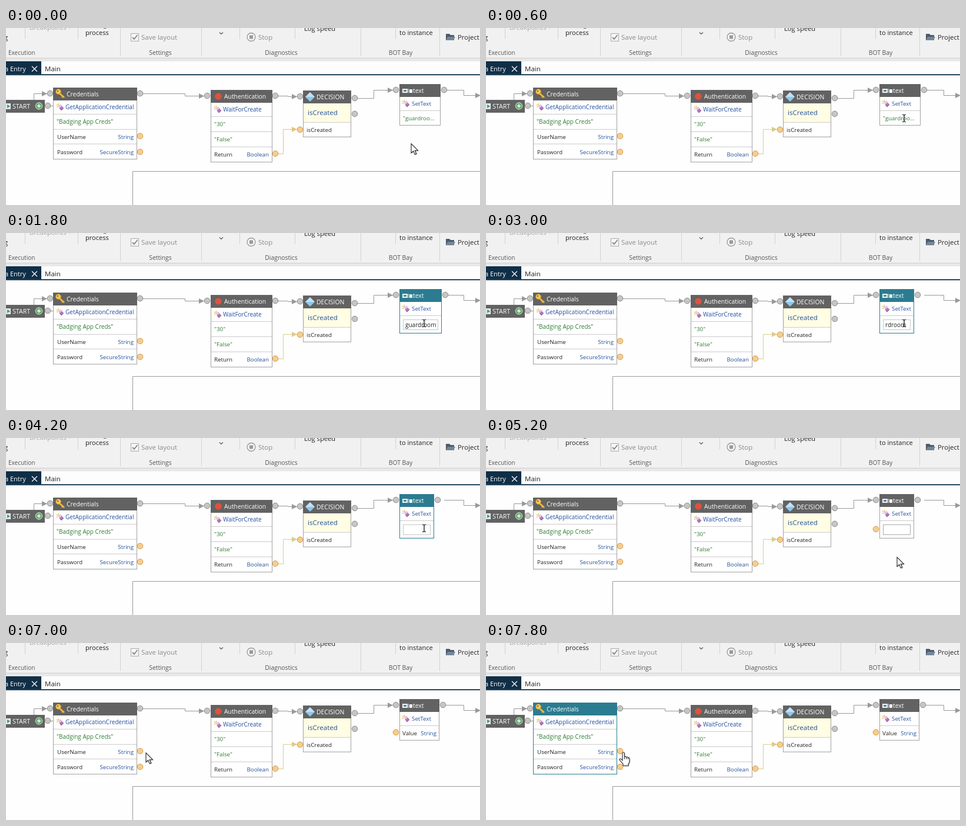
Animation, 806 px wide and 303 px high, one loop 8 s. Source, as an HTML page with a canvas:

```html
<!DOCTYPE html>
<html lang="en">
<head>
<meta charset="utf-8">
<title>Workflow designer</title>
<style>
  html, body { margin: 0; width: 100%; height: 100%; overflow: hidden; background: #fefefe; }
  canvas { display: block; }
</style>
</head>
<body>
<canvas id="stage" width="806" height="303"></canvas>
<script>
const ctx = document.getElementById('stage').getContext('2d');
const LOOP = 8000, STEP = 200;
const INK = '#222', GRAY = '#8f8f8f', GREEN = '#2f7d32', BLUE = '#24509a';
const HEADER = '#626262', TEAL = '#2b7c90';
const USER = 'guardroom';

// ---------- helpers ----------
function text(s, x, y, color = INK, size = 9.8, align = 'left') {
  ctx.font = `${size}px "Open Sans", "Noto Sans", sans-serif`;
  ctx.textAlign = align;
  ctx.fillStyle = color;
  ctx.fillText(s, x, y);
}
function rect(x, y, w, h, color) {
  ctx.fillStyle = color;
  ctx.fillRect(x, y, w, h);
}
function frame(x, y, w, h, color) {
  ctx.strokeStyle = color;
  ctx.lineWidth = 1;
  ctx.strokeRect(x + .5, y + .5, w - 1, h - 1);
}
function line(color, width, ...pts) {
  ctx.strokeStyle = color;
  ctx.lineWidth = width;
  ctx.beginPath();
  for (let i = 0; i < pts.length; i += 2) ctx.lineTo(pts[i], pts[i + 1]);
  ctx.stroke();
}
function poly(fill, ...pts) {
  ctx.fillStyle = fill;
  ctx.beginPath();
  for (let i = 0; i < pts.length; i += 2) ctx.lineTo(pts[i], pts[i + 1]);
  ctx.closePath();
  ctx.fill();
}
function disc(x, y, r, fill, stroke, width = 1) {
  ctx.beginPath();
  ctx.arc(x, y, r, 0, Math.PI * 2);
  if (fill) { ctx.fillStyle = fill; ctx.fill(); }
  if (stroke) { ctx.strokeStyle = stroke; ctx.lineWidth = width; ctx.stroke(); }
}
const port = (x, y) => disc(x, y, 4.8, '#c6c6c6', '#8b8b8b');
const dataPort = (x, y) => disc(x, y, 4.8, '#f7cd90', '#d39a45');
const arrow = (x, y, color) => poly(color, x - 9, y - 4.5, x, y, x - 9, y + 4.5);
function wire(color, ...pts) {
  line(color, 1, ...pts);
  arrow(...pts.slice(-2), color);
}

// ---------- icons ----------
function methodIcon(x, y) {
  poly('#b277b8', x - 3, y - 1, x + 1, y - 4, x + 6, y + 2, x + 2, y + 6);
  poly('#e3c3e8', x - 3, y - 1, x + 1, y - 4, x + 3, y - 1, x - 1, y + 2);
  line('#8c4d98', 1, x - 1, y + 2, x + 2, y + 6, x + 6, y + 2);
  line('#e6b84c', 1.3, x - 6, y - 4, x - 3, y - 2);
  line('#e6b84c', 1.3, x - 3, y - 6, x - 2, y - 3);
  line('#e6b84c', 1.3, x - 6, y, x - 4, y);
}
function keyIcon(x, y) {
  line('#efb83f', 3, x - 2, y - 1, x + 7, y + 7);
  line('#efb83f', 2, x + 3, y + 7, x + 5, y + 4);
  disc(x - 3, y - 3, 4.3, '#f6cb58', '#d99a24');
  disc(x - 4, y - 4, 1.3, HEADER);
}
function fieldIcon(x, y) {
  rect(x, y, 9, 7, '#eef4f8');
  rect(x + 2, y + 2, 5, 3, '#5f8399');
  rect(x + 10, y, 1, 7, '#d0d8de');
  rect(x + 12, y + 1, 5, 6, '#fff');
}

// ---------- window chrome ----------
function ribbon() {
  rect(0, 0, 806, 51, '#f1f1f1');
  rect(0, 51, 806, 1, '#cfcfcf');
  rect(0, 52, 806, 5, '#e8e8e8');
  for (const x of [194, 332, 603, 737]) rect(x, 0, 1, 48, '#d2d2d2');
  for (const x of [32, 122, 397, 491, 662]) rect(x, 0, 1, 19, '#d2d2d2');

  text('g', -3, 20, INK, 11.2);
  text('Breakpoints', 40, 3, '#a3a3a3', 11.2);
  poly('#a3a3a3', 106, -2, 111, -2, 108.5, 1);
  text('Debug', 137, -2, INK, 11.2);
  text('process', 135, 12, INK, 11.1);

  rect(212, 9, 14, 14, '#f6f6f6');
  frame(212, 9, 14, 14, '#aaa');
  line('#8c8c8c', 2, 215, 16, 218, 19, 223.5, 12);
  text('Save layout', 230, 20, '#8a8a8a', 11.5);
  line('#555', 1.2, 363, 7.5, 366, 10.5, 369, 7.5);

  disc(417, 15.5, 7, null, '#999', 1.3);
  rect(414, 12.5, 6, 6, '#999');
  text('Stop', 429, 20, '#8a8a8a', 11.4);
  text('Log speed', 507, 5, INK, 11.2);
  text('to instance', 669, 12, INK, 11.1);

  poly('#4d5b6b', 748, 10, 754, 10, 756, 12, 762, 12, 762, 21, 748, 21);
  poly('#75869a', 751, 15, 764, 15, 761, 21, 748, 21);
  text('Project', 768, 20, INK, 11.4);

  text('Execution', 4, 46, '#555', 10);
  for (const [label, x] of [['Settings', 262.5], ['Diagnostics', 468], ['BOT Bay', 671]])
    text(label, x, 46, '#555', 10.4, 'center');
}
function tabs() {
  rect(0, 57, 806, 23, '#fdfdfd');
  rect(0, 57, 60, 23, '#102f47');
  rect(0, 79, 806, 2, '#24465c');
  text('a Entry', -2, 74, '#fff', 11);
  line('#fff', 1.2, 44, 65.5, 53, 74.5);
  line('#fff', 1.2, 53, 65.5, 44, 74.5);
  text('Main', 66, 74, INK, 11.5);
}

// ---------- diagram ----------
function node(x, y, right, bottom, title, titleX, rules, selected) {
  const w = right - x, color = selected ? TEAL : HEADER;
  rect(x, y, w, bottom - y, '#fff');
  for (const r of rules) rect(x, r, w, 1, '#cbcbcb');
  frame(x, y, w, bottom - y, selected ? TEAL : '#a2a2a2');
  rect(x, y, w, 22, color);
  text(title, titleX, y + 15, '#fff', 10.4);
}
function wires(t) {
  const link = t < STEP ? '#ecc079' : '#d8cd8b';
  wire('#999', 47.5, 123, 47.5, 112.5, 70, 112.5);
  line('#999', 1, 66, 133.5, 80, 133.5);
  wire('#999', 228, 112.5, 304.5, 112.5, 304.5, 116.5, 337, 116.5);
  wire('#999', 458, 116.5, 479.5, 116.5, 479.5, 117.5, 495, 117.5);
  wire('#999', 593, 120.5, 625.5, 120.5, 625.5, 106.5, 658, 106.5);
  wire('#999', 745, 106.5, 778.5, 106.5, 778.5, 115.5, 807, 115.5);
  wire(link, 458, 215.5, 471.5, 215.5, 471.5, 173.5, 495, 173.5);
  line('#999', 1, 806, 245.5, 215.5, 245.5, 215.5, 303);
}
function startNode() {
  rect(-2, 123, 68, 22, HEADER);
  rect(0, 129, 8, 10, '#dfe9ef');
  poly('#3b9a6a', 2, 131, 7, 134, 2, 137);
  text('START', 11, 138, '#fff', 10.6);
  disc(56, 133.5, 5.8, '#68ad70', '#cfe6d0');
  line('#fff', 1.5, 53, 133.5, 59, 133.5);
  line('#fff', 1.5, 56, 130.5, 56, 136.5);
  port(71, 133);
}
function credentials(selected) {
  node(80, 102, 223, 225, 'Credentials', 103, [147, 173, 198], selected);
  keyIcon(92, 112);
  methodIcon(92, 135);
  text('GetApplicationCredential', 101, 139, BLUE, 10);
  text('"Badging App Creds"', 86, 164, GREEN, 10);
  text('UserName', 87, 190);
  text('String', 217, 190, BLUE, 9.8, 'right');
  text('Password', 87, 216, INK, 9.6);
  text('SecureString', 217, 216, BLUE, 9.8, 'right');
  port(75, 112); port(228, 112);
  dataPort(228, 185); dataPort(228, 212);
}
function authentication() {
  node(348, 106, 453, 230, 'Authentication', 371, [151, 177, 203]);
  disc(361, 117, 5.8, '#d9543f');
  methodIcon(360, 139);
  text('WaitForCreate', 369, 143, BLUE, 9.9);
  text('"30"', 354, 168, GREEN);
  text('"False"', 354, 194, GREEN);
  text('Return', 354, 220);
  text('Boolean', 447, 220, BLUE, 9.8, 'right');
  port(342, 116); port(458, 116); dataPort(458, 215);
}
function decision() {
  node(505, 107, 587, 187, 'DECISION', 528, [161]);
  rect(506, 129, 80, 32, '#fffde3');
  poly('#8fc7ee', 517, 110, 525, 118, 517, 126, 509, 118);
  poly('#c2e1f7', 517, 110, 525, 118, 509, 118);
  text('isCreated', 513, 149, BLUE, 11.6);
  text('isCreated', 511, 178, INK, 9.8);
  port(500, 117); port(593, 120); port(593, 147); dataPort(500, 174);
}
function textNode(t) {
  const selected = t >= 1000 && t < 5000;
  const editing = t >= 1000 && t < 5600;
  const removed = Math.min(USER.length, Math.max(0, (t - 2400) / STEP));
  const right = editing ? Math.max(728, 741 - removed * 6.5 | 0) : t < 1000 ? 739 : 737;

  node(669, 96, right, editing ? 172 : 167, 'text', 692, [141], selected);
  fieldIcon(674, 104);
  methodIcon(680, 129);
  text('SetText', 690, 133, BLUE);
  if (editing) {
    frame(675, 148, right - 681, 18, t >= 5000 ? '#aaa' : '#c6c6c6');
    text(USER.slice(removed), 679, 161, INK, 10);
  } else if (t < 1000) {
    text(`"${USER.slice(0, 8)}...`, 675, 158, GREEN);
  } else {
    text('Value', 674, 158);
    text('String', 732, 158, BLUE, 9.8, 'right');
  }
  port(663, 106); port(right + 6, 106);
  if (t >= 5000) dataPort(663, editing ? 156 : 153);
}

// ---------- mouse ----------
const mousePath = [
  [0, 689, 198], [200, 692, 194], [600, 711, 154], [4600, 711, 154], [5200, 699, 204],
  [5800, 699, 204], [6800, 238, 188], [7000, 238, 188], [7400, 232, 187], [8000, 232, 187]
];
function mouseAt(t) {
  const i = mousePath.findIndex(p => p[0] > t);
  const [t0, x0, y0] = mousePath[i - 1], [t1, x1, y1] = mousePath[i];
  const k = (t - t0) / (t1 - t0);
  return [x0 + (x1 - x0) * k, y0 + (y1 - y0) * k];
}
const arrowShape = new Path2D('M0 0V16L3.7 12.6 6.3 18.6 8.8 17.5 6.2 11.7H11.4Z');
const handShape = new Path2D('M0 2Q0 0 1.7 0T3.4 2V8Q5.6 6.6 6.6 8.4 8.4 7.2 9.4 9.2 12 8.6 12 11.4V15Q12 18 10 20V23H1V20L-5 13Q-5.5 10.5-3 11.2L0 14Z');
function mouse(t) {
  const [x, y] = mouseAt(t);
  if (t >= 400 && t < 4800) {
    line('#222', 1.2, x - 3, y - 6, x, y - 5, x + 3, y - 6);
    line('#222', 1.4, x, y - 5, x, y + 6);
    line('#222', 1.2, x - 3, y + 7, x, y + 6, x + 3, y + 7);
    return;
  }
  const shape = t >= 7400 ? handShape : arrowShape;
  ctx.save();
  ctx.translate(x, y);
  ctx.shadowColor = '#0005';
  ctx.shadowBlur = 2;
  ctx.shadowOffsetX = ctx.shadowOffsetY = 1;
  ctx.fillStyle = '#fff';
  ctx.fill(shape);
  ctx.shadowColor = 'transparent';
  ctx.strokeStyle = '#222';
  ctx.lineWidth = 1.1;
  ctx.stroke(shape);
  if (shape === handShape) {
    for (const fx of [3.4, 6.5, 9.4]) line('#222', 1, fx, 8.5, fx, 12);
  }
  ctx.restore();
}

function draw(now) {
  const t = Math.floor(now % LOOP / STEP) * STEP;
  rect(0, 0, 806, 303, '#fefefe');
  ribbon();
  tabs();
  wires(t);
  startNode();
  credentials(t >= 7600);
  authentication();
  decision();
  textNode(t);
  mouse(t);
}
const begin = performance.now();
function tick() {
  draw(performance.now() - begin);
  requestAnimationFrame(tick);
}
tick();
</script>
</body>
</html>
```
